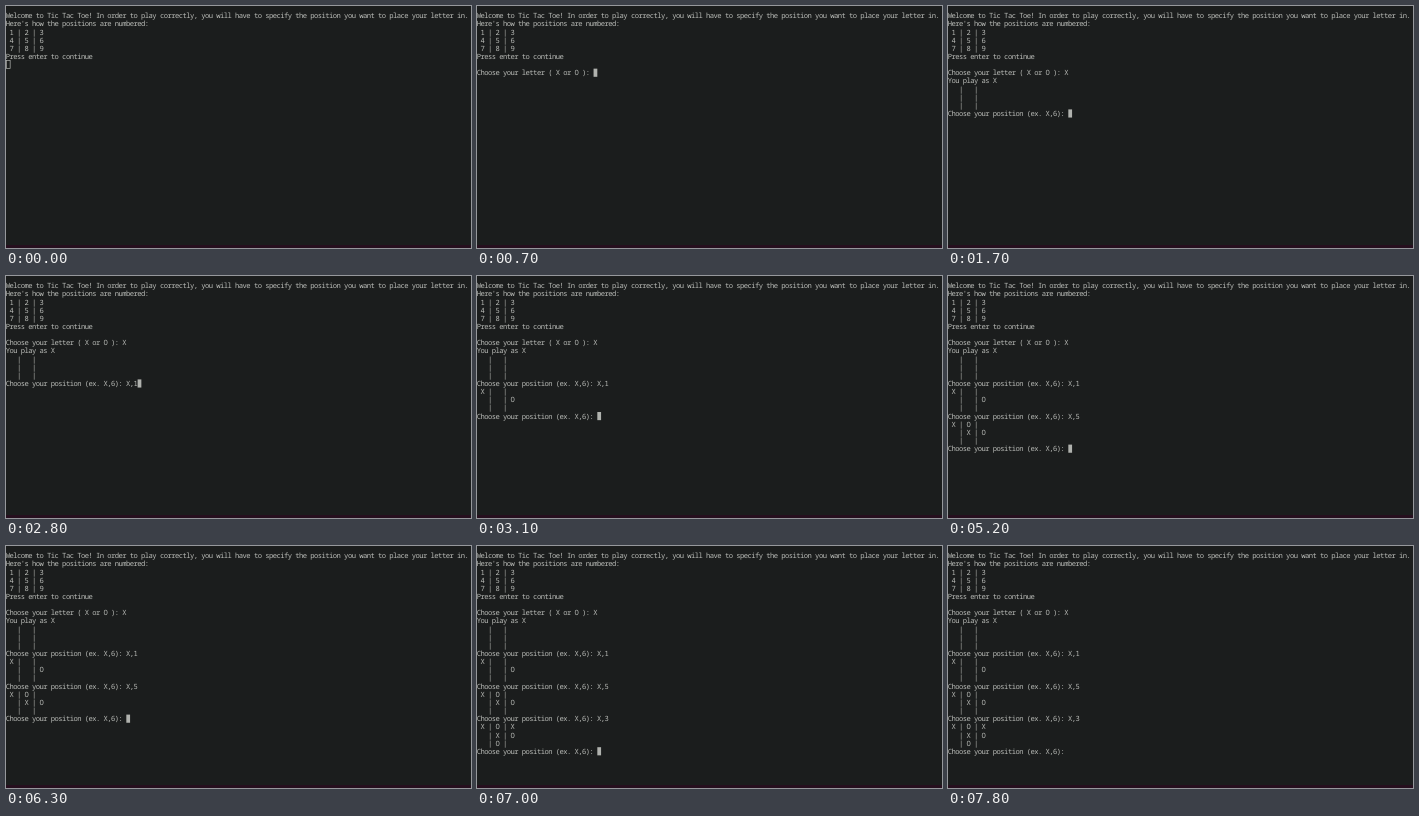
An HTML page with a canvas that plays this animation: 465 px wide and 242 px high, repeating every 8000 ms.

```html
<!DOCTYPE html>
<html lang="en">
<head>
<meta charset="utf-8">
<title>Tic Tac Toe</title>
<style>
html, body { margin: 0; width: 100%; height: 100%; overflow: hidden; background: #1b1d1d; }
canvas { display: block; }
</style>
</head>
<body>
<canvas id="stage" width="465" height="242"></canvas>
<script>
const ctx = document.getElementById('stage').getContext('2d');
const LOOP = 8000;
const CELL = 3.76, LINE = 8.15, TOP = 5.6, BASE = 6.6;
const SIZE = 7.2, ZOOM = 10;
const INK = '#bbbdb9', BLOCK = '#b0b2ae';

const ASK = 'Choose your position (ex. X,6): ';
const LETTER = 'Choose your letter ( X or O ): ';
const EMPTY = '   |   |';

// Each event: time, text appended to the screen, cursor style.
const events = [
  [0, [
    'Welcome to Tic Tac Toe! In order to play correctly, you will have to specify the position you want to place your letter in.',
    "Here's how the positions are numbered:",
    ' 1 | 2 | 3', ' 4 | 5 | 6', ' 7 | 8 | 9',
    'Press enter to continue', ''
  ].join('\n'), 'hollow'],
  [100, '', 'block'],
  [700, '\n' + LETTER, 'block'],
  [1400, 'X', 'block'],
  [1700, ['', 'You play as X', EMPTY, EMPTY, EMPTY, ASK].join('\n'), 'block'],
  [2400, 'X', 'block'],
  [2600, ',', 'block'],
  [2800, '1', 'block'],
  [3100, ['', ' X |   |', '   |   | O', EMPTY, ASK].join('\n'), 'block'],
  [3600, '', 'off'],
  [3800, 'X', 'block'],
  [4100, ',', 'block'],
  [4700, '', 'off'],
  [4900, '5', 'block'],
  [5200, ['', ' X | O |', '   | X | O', EMPTY, ASK].join('\n'), 'block'],
  [5700, '', 'off'],
  [6300, '', 'block'],
  [6500, 'X,', 'block'],
  [6700, '3', 'block'],
  [7000, ['', ' X | O | X', '   | X | O', '   | O |', ASK].join('\n'), 'block'],
  [7800, '', 'off']
];

function drawText(lines) {
  ctx.save();
  ctx.scale(1 / ZOOM, 1 / ZOOM);
  ctx.font = `condensed ${SIZE * ZOOM}px "Noto Sans Mono", "DejaVu Sans Mono", monospace`;
  ctx.textRendering = 'geometricPrecision';
  ctx.textAlign = 'center';
  ctx.fillStyle = INK;
  lines.forEach((line, row) => {
    const y = (TOP + row * LINE + BASE) * ZOOM;
    [...line].forEach((ch, col) => {
      if (ch !== ' ') ctx.fillText(ch, (col + 0.5) * CELL * ZOOM, y);
    });
  });
  ctx.restore();
}

function drawCursor(style, col, row) {
  const x = col * CELL, y = TOP + row * LINE;
  if (style === 'block') {
    ctx.fillStyle = BLOCK;
    ctx.fillRect(x, y, CELL, LINE);
  } else if (style === 'hollow') {
    ctx.strokeStyle = BLOCK;
    ctx.lineWidth = 0.7;
    ctx.strokeRect(x + 0.4, y - 0.1, CELL, LINE);
  }
}

function draw(t) {
  const past = events.filter(e => e[0] <= t);
  const lines = past.map(e => e[1]).join('').split('\n');
  const row = lines.length - 1;

  ctx.fillStyle = '#1b1d1d';
  ctx.fillRect(0, 0, 465, 242);
  ctx.fillStyle = '#260f1e';
  ctx.fillRect(0, 239, 465, 3);
  drawText(lines);
  drawCursor(past[past.length - 1][2], lines[row].length, row);
}

const start = performance.now();
function tick() {
  draw((performance.now() - start) % LOOP);
  requestAnimationFrame(tick);
}
tick();
</script>
</body>
</html>
```
